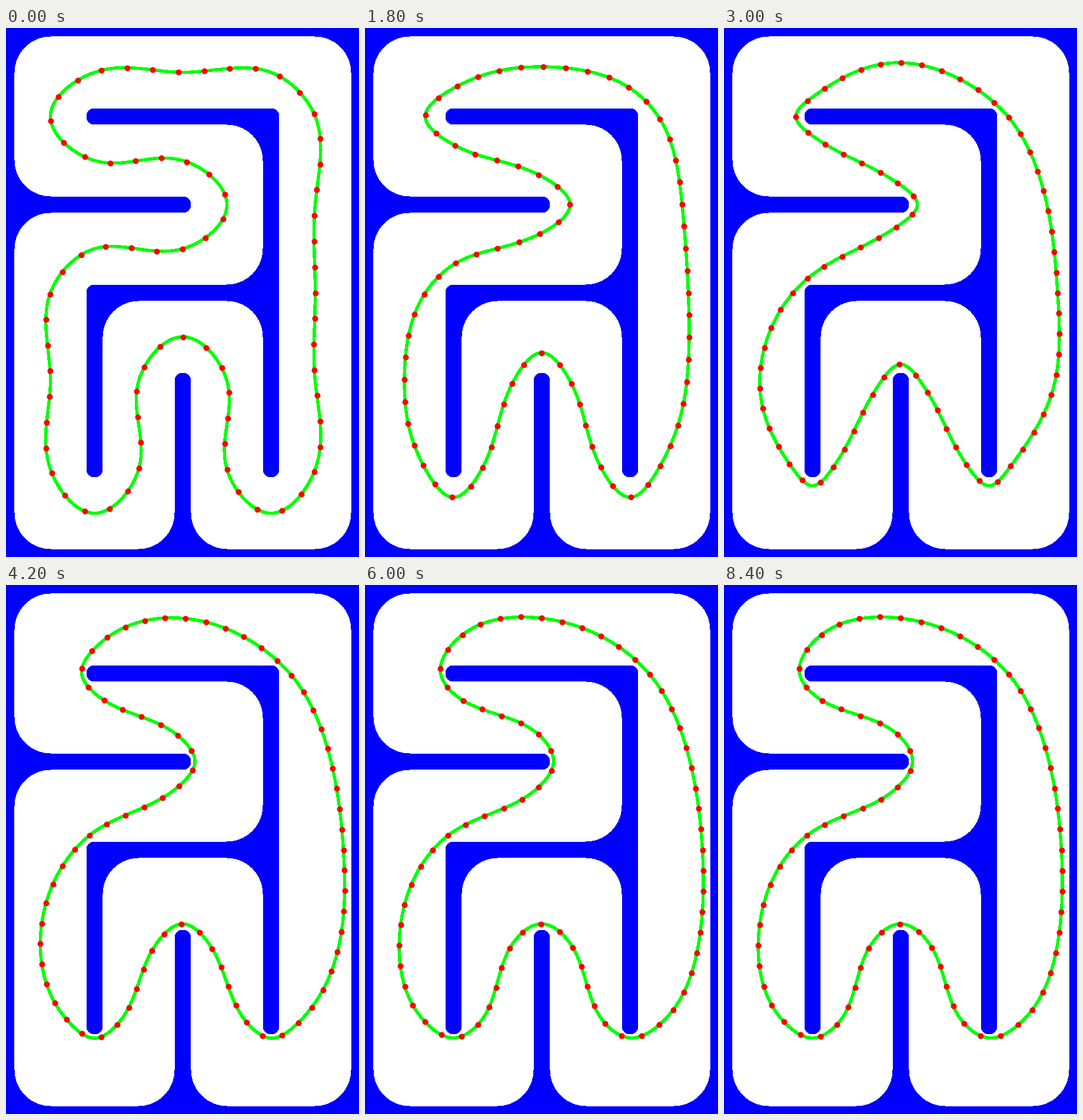
Animation of 600x900 px, one loop 9 s. Source, as a matplotlib script:

```python
import numpy as np
import matplotlib.pyplot as plt
from matplotlib.animation import FuncAnimation

W, H, CELL, DPI = 600, 900, 150, 100
PX = 72 / DPI
BLUE, GREEN, RED = "#0000ff", "#00ff00", "#ff0000"
FRAMES, INTERVAL, MARKERS = 15, 600, 72

# The track visits every cell once: right, down, left and up moves
MOVES = "DDDLUULDDLUUURRULLURRRDD"
COMPASS = {"R": (1, 0), "L": (-1, 0), "D": (0, 1), "U": (0, -1)}
STEPS = np.array([COMPASS[m] for m in MOVES])
CENTERS = np.array([525, 375]) + CELL * (np.cumsum(STEPS, axis=0) - STEPS)
GATES = CENTERS + STEPS * CELL // 2
ALONG_GATE = np.abs(STEPS[:, ::-1])
STRAIGHT = ((STEPS == np.roll(STEPS, 1, axis=0))
            & (STEPS == np.roll(STEPS, -1, axis=0))).all(axis=1)

# Where the settled loop crosses each gate, measured from its middle
REST = np.array([48, 43, -28, -55, 37, -34, 51, 33, -36, -55, 34, -17,
                 40, 44, -37, -55, 34, -41, 53, 23, -19, 44, -43, 27])
TIPS = np.abs(REST) > 50
REACH, CUT, SLACK, SLACK_SLOT = 54, 42, 30, 8


def gate_points(slot):
    """Tighten every corner evenly, then settle into the resting loop."""
    limit = REACH * np.sin(np.pi / 2 * np.clip((slot - 1) / 6, 0, 1))
    settle = np.clip((slot - 5) / 4, 0, 1)
    cut = np.sign(REST) * np.minimum(limit, np.maximum(np.abs(REST), CUT))
    tight = np.where(STRAIGHT, REST * limit / REACH, cut)
    pull = (1 - settle) * tight + settle * REST
    if slot == SLACK_SLOT:  # the loop goes slack once, except at wall ends
        pull = np.where(TIPS, pull, np.clip(pull, -SLACK, SLACK))
    return GATES + pull[:, None] * ALONG_GATE


def smooth_loop(points, samples=40):
    """Closed cubic spline through the points, spaced by chord length."""
    delta = np.roll(points, -1, axis=0) - points
    h = np.linalg.norm(delta, axis=1)[:, None]
    before, after = np.roll(1 / h, 1, axis=0), 1 / h
    eye = np.eye(len(points))
    system = (2 * (before + after) * eye
              + before * np.roll(eye, -1, axis=1)
              + after * np.roll(eye, 1, axis=1))
    bend = 3 * delta / h ** 2
    slope = np.linalg.solve(system, bend + np.roll(bend, 1, axis=0))

    t = (np.arange(samples) / samples)[:, None]
    parts = []
    for i in range(len(points)):
        j = (i + 1) % len(points)
        parts.append(points[i] + delta[i] * t ** 2 * (3 - 2 * t)
                     + h[i] * t * (1 - t) * (slope[i] * (1 - t) - slope[j] * t))
    return np.vstack(parts + [points[:1]])


def evenly_spaced(curve, count):
    lengths = np.linalg.norm(np.diff(curve, axis=0), axis=1)
    travelled = np.r_[0, np.cumsum(lengths)]
    stops = np.arange(count) * travelled[-1] / count
    return [np.interp(stops, travelled, curve[:, k]) for k in (0, 1)]


def draw_walls(ax):
    open_gates = {tuple(g) for g in GATES}
    half = CELL // 2
    for x in range(0, W + 1, half):
        for y in range(0, H + 1, half):
            vertical = x % CELL == 0 and y % CELL
            horizontal = y % CELL == 0 and x % CELL
            if (x, y) in open_gates or not (vertical or horizontal):
                continue
            dx, dy = (0, half) if vertical else (half, 0)
            ax.plot([x - dx - 1, x + dx - 1], [y - dy - 1, y + dy - 1],
                    color=BLUE, lw=27 * PX, solid_capstyle="round",
                    antialiased=False)


def draw_corners(ax, radius=61.5):
    """Fill the outer corner of each cell where the track turns."""
    angle = np.linspace(-np.pi / 2, -np.pi, 30)
    arc = radius * np.c_[np.cos(angle), np.sin(angle)]
    local = np.vstack([[(-75, -75), (75, -75), (75, -radius)], arc,
                       [(-radius, 75), (-75, 75)]])
    for i, center in enumerate(CENTERS):
        ahead, back = STEPS[i], -STEPS[i - 1]
        if ahead @ back == 0:
            shape = center + local @ np.array([ahead, back])
            ax.fill(*shape.T, color=BLUE, lw=0, antialiased=False)


fig = plt.figure(figsize=(W / DPI, H / DPI), dpi=DPI, facecolor="white")
ax = fig.add_axes([0, 0, 1, 1])
ax.axis("off")
draw_walls(ax)
draw_corners(ax)
ax.set_xlim(-0.5, W - 0.5)
ax.set_ylim(H - 0.5, -0.5)

path, = ax.plot([], [], color=GREEN, lw=4.4 * PX, antialiased=False, zorder=3)
dots, = ax.plot([], [], "o", color=RED, ms=10 * PX, mew=0,
                antialiased=False, zorder=4)


def update(slot):
    curve = smooth_loop(gate_points(slot))
    path.set_data(*curve.T)
    dots.set_data(*evenly_spaced(curve, MARKERS))
    return path, dots


anim = FuncAnimation(fig, update, frames=FRAMES, interval=INTERVAL,
                     repeat=True, repeat_delay=0)
plt.show()
```
